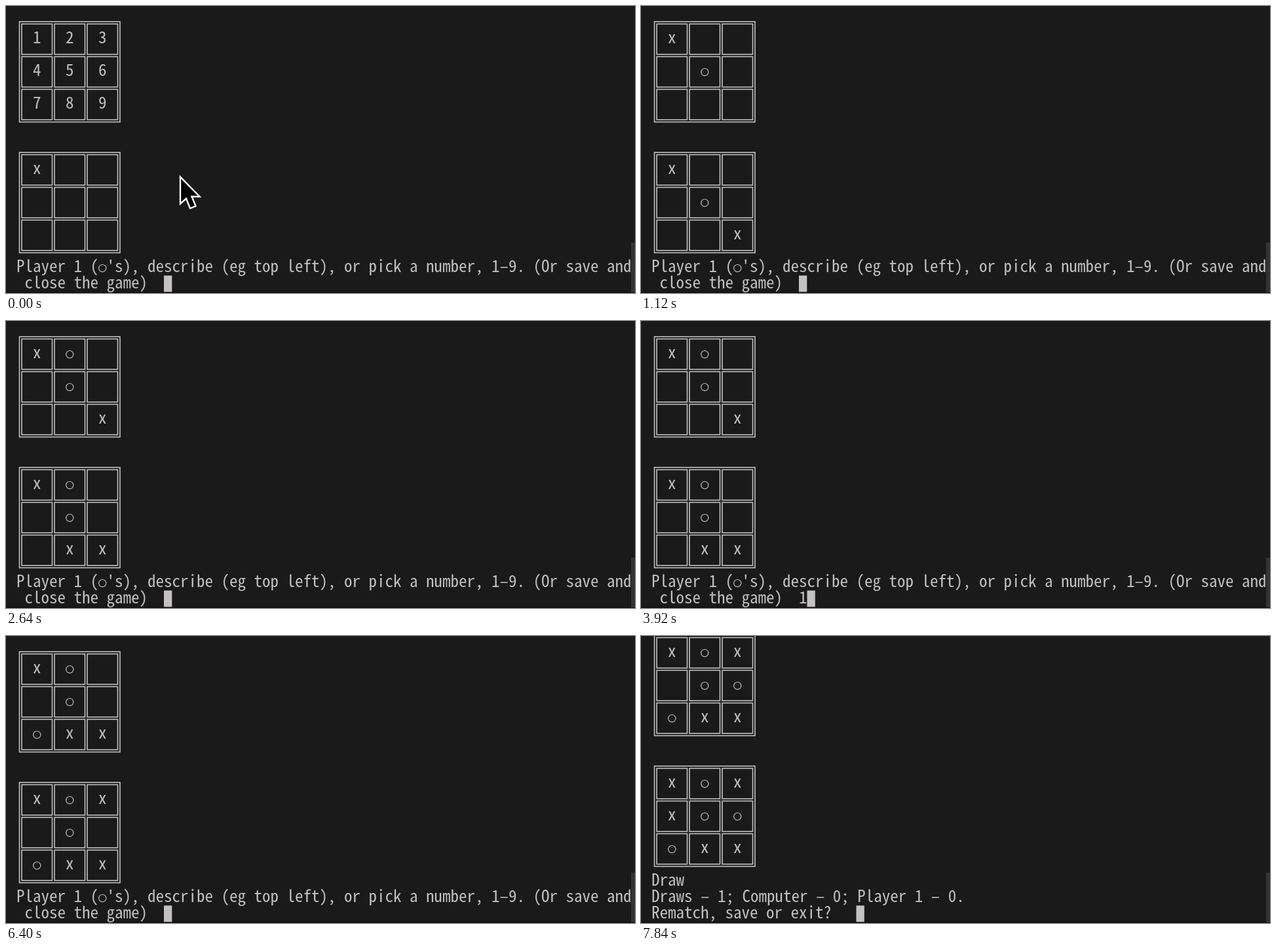
Recreate the animation shown at these times as an HTML page. Size 960 by 439 pixels, loop 8 s.

```html
<!DOCTYPE html>
<html lang="en">
<head>
<meta charset="utf-8">
<title>Noughts and crosses</title>
<style>
html, body { margin: 0; width: 100%; height: 100%; overflow: hidden; background: #1a1a1a; }
svg { display: block; width: 960px; height: 439px; }
text { font: 25px "Noto Sans Mono CJK SC", "Noto Sans Mono CJK JP", "Noto Sans Mono", monospace; fill: #c1c1c1; white-space: pre; }
.lines { fill: none; stroke: #c1c1c1; stroke-width: 1.6; }
.ring { fill: none; stroke: #c1c1c1; stroke-width: 1.2; }
</style>
</head>
<body>
<svg viewBox="0 0 960 439">
  <rect width="960" height="439" fill="#1a1a1a"/>
  <rect y="437.5" width="960" height="1.5" fill="#140d10"/>
  <rect x="954" y="362" width="6" height="76" fill="#333"/>
  <g id="screen"></g>
  <path id="pointer" d="M266 261.5V302.5L275 294.5L281 309.5L289.5 306L283.5 291.5H295.5Z"
    fill="#000" stroke="#fff" stroke-width="2.4" stroke-linejoin="miter"/>
</svg>
<script>
const LOOP = 8000, LEFT = 16, TOP = 12.3, CW = 12.5, CH = 25;
const screen = document.getElementById("screen");
const pointer = document.getElementById("pointer");

const ask = ["Player 1 (o's), describe (eg top left), or pick a number, 1–9. (Or save and"];
const prompt = " close the game)  ";
const end = ["Draw", "Draws – 1; Computer – 0; Player 1 – 0."];

// [start ms, upper board, lower board, typed text]
const turns = [
  [0, "123456789", "x........", ""],
  [160, "123456789", "x........", "5"],
  [1120, "x...o....", "x...o...x", ""],
  [2480, "x...o....", "x...o...x", "2"],
  [2640, "xo..o...x", "xo..o..xx", ""],
  [3920, "xo..o...x", "xo..o..xx", "1"],
  [5440, "xo..o...x", "xo..o..xx", ""],
  [5520, "xo..o...x", "xo..o..xx", "7"],
  [6400, "xo..o.oxx", "xox.o.oxx", ""],
  [7680, "xo..o.oxx", "xox.o.oxx", "6"],
  [7840, "xox.oooxx", "xoxxoooxx", ""]
];

const px = col => LEFT + col * CW;
const py = row => TOP + row * CH;
const text = (s, col, row) => `<text x="${px(col)}" y="${py(row) + 20}">${s}</text>`;
const ring = (col, row) =>
  `<circle class="ring" cx="${px(col + .5)}" cy="${py(row) + 13.8}" r="5.6"/>`;
const box = (x, y, size) => `<rect x="${x}" y="${y}" width="${size}" height="${size}"/>`;

function board(cells, row) {
  const x = px(.5), y = py(row + .5) + .9;
  let lines = box(x - 1.75, y - 1.75, 153.5), marks = "";
  [...cells].forEach((c, i) => {
    const col = i % 3, line = Math.floor(i / 3);
    lines += box(x + col * 50 + 1.75, y + line * 50 + 1.75, 46.5);
    const at = [2 + col * 4, row + 1 + line * 2];
    if (c === "o") marks += ring(...at);
    else if (c !== ".") marks += text(c, ...at);
  });
  return `<g class="lines">${lines}</g>${marks}`;
}

function write(s, row) {
  const i = s.indexOf("(o'");
  if (i < 0) return text(s, 0, row);
  return text(s.slice(0, i + 1), 0, row) + ring(i + 1, row) + text(s.slice(i + 2), i + 2, row);
}

function draw([start, upper, lower, typed]) {
  const over = start === 7840, shift = over ? 1 : 0;
  const body = over ? end : ask;
  const last = (over ? "Rematch, save or exit?   " : prompt) + typed;
  screen.innerHTML = board(upper, -shift) + board(lower, 8 - shift) +
    body.map((s, i) => write(s, 16 - body.length + i)).join("") +
    text(last, 0, 16) +
    `<rect x="${px(last.length)}" y="412.3" width="12.3" height="25" fill="#c3c1c1"/>`;
  pointer.style.display = start === 0 ? "" : "none";
}

let shown;
function tick() {
  const t = performance.now() % LOOP;
  const turn = turns.filter(s => s[0] <= t).pop();
  if (turn !== shown) draw(shown = turn);
  requestAnimationFrame(tick);
}
tick();
</script>
</body>
</html>
```
